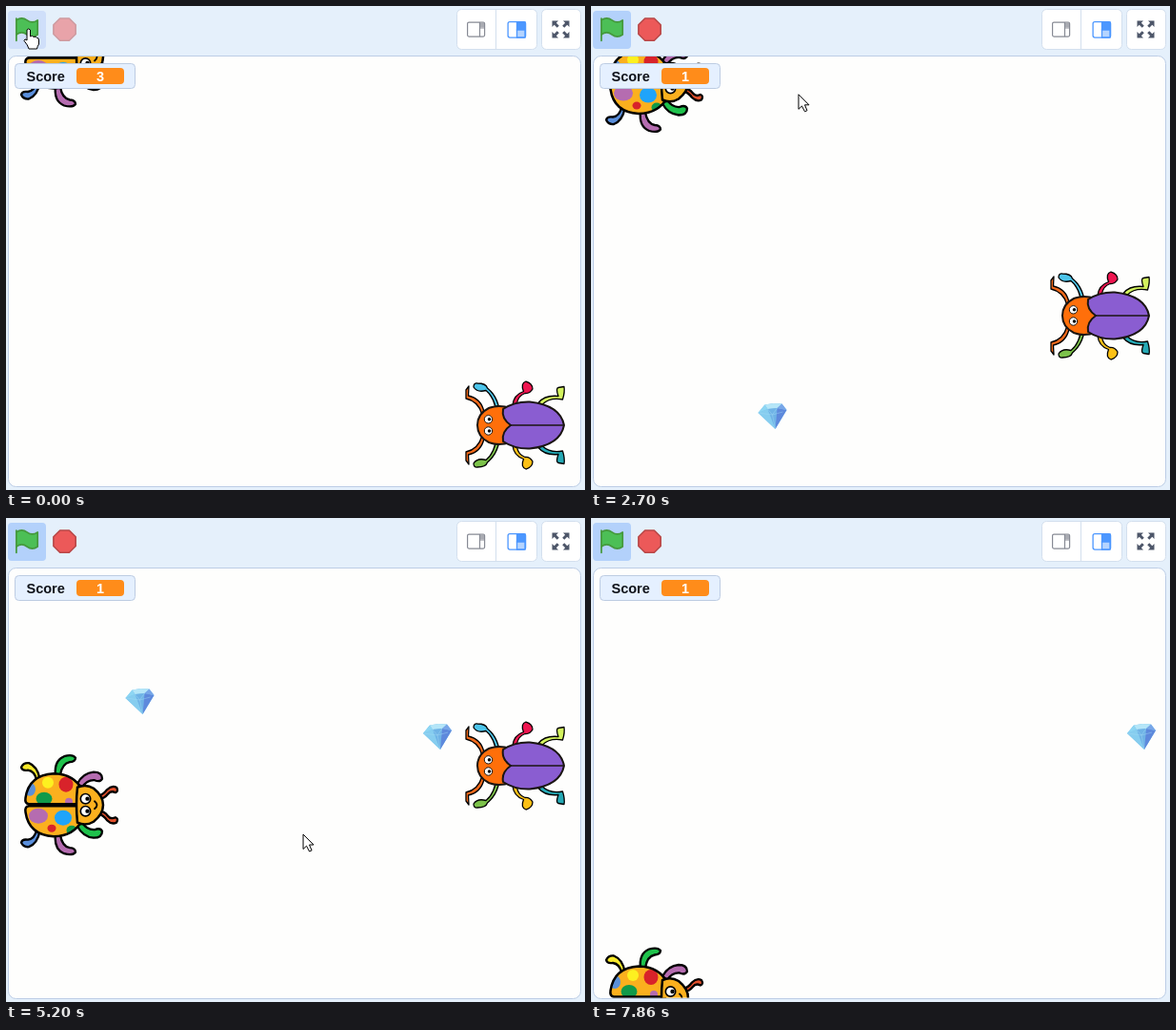
These frames come from a looping animation (608x508 px, 7.9 s). An HTML page:

```html
<!DOCTYPE html>
<html lang="en">
<head>
<meta charset="utf-8">
<title>Bug game</title>
<style>
  html, body { margin: 0; width: 100%; height: 100%; overflow: hidden; background: #e5f0fb; }
  svg { display: block; width: 608px; height: 508px; }
  text { font-family: "Liberation Sans", Arial, sans-serif; font-size: 14.5px; font-weight: bold; }
</style>
</head>
<body>
<svg viewBox="0 0 608 508" xmlns="http://www.w3.org/2000/svg">
  <defs>
    <clipPath id="stageClip"><rect x="3" y="53" width="600" height="450.5" rx="7"/></clipPath>
    <path id="lobe" d="M78 186.5H24Q19.500 186 20.500 180Q24 156 50 154.500Q72 155 80 172Z"/>
    <g id="shell"><use href="#lobe"/><use href="#lobe" transform="matrix(1 0 0 -1 0 375)"/></g>
    <clipPath id="shellClip"><use href="#lobe"/><use href="#lobe" transform="matrix(1 0 0 -1 0 375)"/></clipPath>
    <g id="gem">
      <path d="M-8-11.500L1-13 10-12.500 15-6 3 14-15-3Z" fill="#7cc4ee"/>
      <path d="M-8-11.500L1-13 10-12.500 5-8-5-7Z" fill="#b5e6f8"/>
      <path d="M-8-11.500L-5-7-15-3Z" fill="#8dd6f3"/>
      <path d="M-15-3L-5-7 3 14Z" fill="#86cdef"/>
      <path d="M-5-7L5-8 3 14Z" fill="#6fb3e6"/>
      <path d="M5-8L15-6 3 14Z" fill="#5e89dc"/>
      <path d="M10-12.500L15-6 5-8Z" fill="#78a6e8"/>
      <path d="M-5-7L0-1 3 14M0-1L5-8M-15-3L0-1 11-4" fill="none" stroke="#a5dcf5" stroke-width=".7" opacity=".6"/>
    </g>
  </defs>

  <!-- toolbar -->
  <rect id="flagBg" x="2" y="5" width="40" height="40" rx="4"/>
  <g transform="translate(9.800 12) scale(1.45)" fill="#4cbf56" stroke="#45993d" stroke-linecap="round" stroke-linejoin="round" stroke-width="1.2">
    <path d="M.75 2A6.44 6.44 0 0 1 8.44 2a6.44 6.44 0 0 0 7.69 0V12.4a6.44 6.44 0 0 1-7.69 0a6.44 6.44 0 0 0-7.69 0"/>
    <path d="M.75 16.75V.75"/>
  </g>
  <path id="stop" transform="translate(49 12.100) scale(1.79)" d="M4.300 .5H9.700L13.500 4.300V9.700L9.700 13.500H4.300L.5 9.700V4.300Z" fill="#ec5959" stroke="#b84848" stroke-width=".9" stroke-linejoin="round"/>
  <g fill="#fff" stroke="#d3dfee">
    <rect x="473.5" y="3.500" width="84" height="42" rx="5"/>
    <path d="M514.500 3.500v42"/>
    <rect x="562.5" y="3.500" width="41" height="42" rx="5"/>
  </g>
  <g fill="none" stroke="#878a94" stroke-width="1.2">
    <rect x="484.600" y="17.100" width="18" height="15" rx="1.500"/>
    <path d="M497.500 17v15M497.500 23h5"/>
    <rect x="498" y="17.500" width="4" height="5" fill="#a9abb2" stroke="none"/>
  </g>
  <g stroke="#4c97ff" stroke-width="1.300">
    <rect x="527.100" y="16.600" width="18.500" height="16.500" rx="2" fill="#fff"/>
    <path d="M536.500 17h8.500v8h-8.500z" fill="#4c97ff"/>
    <path d="M536.500 25h8.500v8h-8.500z" fill="#b5d4ff"/>
  </g>
  <g id="expand" fill="#4d5669"></g>

  <!-- stage -->
  <rect x="2.500" y="52.500" width="601" height="452" rx="8" fill="#fefefd" stroke="#bccde6"/>
  <g clip-path="url(#stageClip)">
    <g id="beetle" stroke="#1a1512" stroke-width="2" stroke-linejoin="round">
      <g id="beetleLegs" stroke="#000" stroke-width="1.300"></g>
      <path d="M530 422Q517 418 507 422Q495 428 495 440Q495 452 507 458Q517 462 530 458Z" fill="#ff6f0a"/>
      <path d="M530 440Q520 433 522 423Q534 415 550 415.500Q582 419 586 440Q582 461 550 464.500Q534 465 522 457Q520 447 530 440Z" fill="#8a5dd1"/>
      <path d="M530 440H586" fill="none" stroke-width="1.600"/>
      <g id="beetleEyes" stroke-width="1"></g>
    </g>
    <g id="gems"></g>
    <g id="lady">
      <g id="legs" stroke="#000" stroke-width="2.300" stroke-linejoin="round"></g>
      <use href="#shell" fill="#fbb01e"/>
      <g id="spots" clip-path="url(#shellClip)"></g>
      <use href="#shell" fill="none" stroke="#000" stroke-width="2.500"/>
      <path d="M75 169Q84 165 92 170Q102 178 102 187.500Q102 197 92 205Q84 210 75 206Q73 187 75 169Z" fill="#fbb01e" stroke="#000" stroke-width="2.500"/>
      <path d="M93 183.500Q98 187.500 93 191.500" fill="none" stroke="#000" stroke-width="1.800" stroke-linecap="round"/>
      <g id="ladyEyes" stroke="#000" stroke-width="1.700"></g>
    </g>
  </g>

  <!-- score -->
  <rect x="9.500" y="60.500" width="126" height="26" rx="4" fill="#e5f0ff" stroke="#bdcce2"/>
  <text x="21.500" y="79" fill="#10131a">Score</text>
  <rect x="74" y="65" width="50" height="17" rx="4" fill="#ff8c1a"/>
  <text id="score" x="99" y="79" text-anchor="middle" fill="#fff"></text>

  <g id="mouse" fill="#fff" stroke="#000" stroke-linejoin="round">
    <path id="arrow" d="M.5 .5V16L4 12.700L7 18.500L9.500 17.400L7 11.500H11.500Z"/>
    <path id="hand" d="M-1 1Q.5-1 2.500 1V8Q5 6.500 6 8.500Q8.500 7.500 9.500 9.500Q11.500 9 11.500 12V16Q10 18 9.500 21H1Q0 17-4 12.500Q-3.500 9.500-1 12Z"/>
  </g>
</svg>
<script>
const LOOP = 7900, TICK = 32.5, LAG = 60;
const $ = id => document.getElementById(id);
const clamp = (v, lo, hi) => Math.min(hi, Math.max(lo, v));
const show = (el, on) => el.setAttribute('display', on ? 'inline' : 'none');
const place = (el, x, y) => el.setAttribute('transform', `translate(${x.toFixed(2)} ${y.toFixed(2)})`);

// Each limb has an upper colour and a mirrored lower colour.
function limbs(id, axis, list) {
  const side = i => list.map(l => `<path d="${l[0]}" fill="${l[i]}"/>`).join('');
  $(id).innerHTML = side(1) + `<g transform="matrix(1 0 0 -1 0 ${axis * 2})">${side(2)}</g>`;
}
limbs('legs', 187.5, [
  ['M32 161Q30 152 23 151Q17 152 16 148Q18 143 24 143.500Q33 147 35.500 160Z', '#f7e92b', '#5a8fdc'],
  ['M52 157Q50 141 61 136.500Q70 134 73 138Q73 142 67 142.500Q59 144 57 156Z', '#1fc24c', '#b56cb0'],
  ['M75 165Q81 154 92 153Q101 153 101 160Q99 164 93 161.500Q85 161 80 169Z', '#b56cb0', '#1fc24c'],
  ['M97 178Q102 177 106 171.500Q111 166.500 116 169Q118.500 173 115 174.500Q110 172 107 176Q103 181 98 181Z', '#e2502c', '#e2502c']
]);
limbs('beetleLegs', 440, [
  ['M486 399L483 403L483 412Q496 415 499.500 428L502 426Q499 412 485.500 409Z', '#f26a1b', '#f26a1b'],
  ['M514 421Q511 409 504 403.500Q495 406 491 400Q491 395.500 495 396Q504 396 505.500 401Q514 408 517 419Z', '#4cc4ea', '#7cc24a'],
  ['M532 419Q533 408 543.500 404.500Q540 396 546 394Q553 396 553 402Q550 407 545 406.500Q538 409 536.500 417Z', '#ee1550', '#fcc015'],
  ['M559 416.500Q566 408 580 409.500Q577 401 580 400.500L586 399.500Q587 405 584.500 413Q571 410.500 563.500 418Z', '#d3f25e', '#25a9b5']
]);
const eye = (x, y, r, dx) =>
  `<circle cx="${x}" cy="${y}" r="${r}" fill="#fff"/><circle cx="${x + dx}" cy="${y}" r="${r * .42}" fill="#000" stroke="none"/>`;
$('ladyEyes').innerHTML = eye(83.5, 181, 5.2, 2) + eye(83.5, 194, 5.2, 2);
$('beetleEyes').innerHTML = eye(506.5, 433.8, 4.2, 1) + eye(506.5, 446, 4.2, 1);
$('spots').innerHTML = [
  [44, 164, 6, 6, '#fdf020'], [63, 166, 7.500, 8, '#d8232a'], [25, 171, 6, 7, '#5b90d8'],
  [40, 181, 8.500, 7, '#119a4a'], [66, 184, 4, 4, '#b56cb0'], [34, 199, 10, 8, '#b56cb0'],
  [60, 201, 9, 8, '#1fa4fa'], [48, 212, 4.500, 4, '#d8232a'], [69, 214, 5.500, 5, '#119a4a']
].map(([x, y, a, b, c]) => `<ellipse cx="${x}" cy="${y}" rx="${a}" ry="${b}" fill="${c}"/>`).join('');
$('expand').innerHTML = [0, 90, 180, 270].map(a =>
  `<path transform="translate(582.5 24.5) rotate(${a})" d="M-9-9H-2.500L-4.700-6.800L-1.700-3.800L-3.800-1.700L-6.800-4.700L-9-2.500Z"/>`).join('');

// pointer tip: time, x, y
const path = [
  [0, 23, 24], [320, 23, 24], [1008, 149, 371], [1305, 149, 280], [1800, 148, 187], [1860, 148, 188],
  [2310, 190, 431], [2640, 215, 80], [3070, 227, 305], [3500, 228, 248], [3560, 228, 235],
  [4140, 222, 229], [4270, 219, 167], [4380, 218, 85], [4500, 218, 125], [4560, 218, 126],
  [4950, 270, 192], [5070, 290, 266], [5410, 340, 394], [5840, 367, 332], [5900, 369, 308],
  [6470, 410, 229], [6630, 430, 90], [6730, 440, 121], [6900, 450, 301], [6960, 451, 346],
  [7250, 458, 430], [7600, 460, 530], [7900, 460, 540]
];
const slope = (i, c) => {
  const a = path[i], b = path[i + 1];
  return a && b ? (b[c] - a[c]) / (b[0] - a[0]) : 0;
};
const tangent = (i, c) => {
  const a = slope(i - 1, c), b = slope(i, c);
  return a * b > 0 ? 2 * a * b / (a + b) : 0;
};
// Monotone cubic through the path points.
function pointer(t, c) {
  t = clamp(t, 0, LOOP - 1);
  const i = path.findIndex((p, k) => path[k + 1][0] > t);
  const a = path[i], b = path[i + 1], h = b[0] - a[0], u = (t - a[0]) / h, v = 1 - u;
  return a[c] * v * v * (1 + 2 * u) + b[c] * u * u * (3 - 2 * u)
    + h * u * v * (tangent(i, c) * v - tangent(i + 1, c) * u);
}

// shots: launch time, y, steps before it hits a beetle or the edge
const HIT = 33, EDGE = 41;
const shots = [
  [1064, 371.5, HIT], [1356, 280, HIT], [2374, 430, EDGE], [3122, 305, EDGE],
  [4186, 229, HIT], [5006, 192, HIT], [5462, 394, EDGE], [6516, 229, EDGE]
];
$('gems').innerHTML = shots.map(() => '<use href="#gem"/>').join('');
const gems = [...$('gems').children];

// beetles: from, to, y
const beetles = [
  [0, 300, 440], [1150, 1750, 235], [1990, 2780, 325],
  [4400, 5100, 152.5], [5200, 5650, 260], [6010, 7150, 177.5]
];
const pauses = [1860, 3560];

function draw(t) {
  for (const p of pauses) if (t >= p && t < p + 70) t = p;
  const on = t >= 300;
  $('flagBg').setAttribute('fill', on ? '#b3d1fb' : '#cfdffa');
  $('stop').setAttribute('opacity', on ? 1 : .5);
  $('score').textContent = !on ? 3 : t < 2140 ? 0 : 1;

  place($('lady'), 0, clamp(pointer(t - LAG, 2), 53.5, 503.5) - 187.5);

  const b = beetles.find(([from, to]) => t >= from && t < to);
  show($('beetle'), b);
  if (b) place($('beetle'), 0, b[2] - 440);

  shots.forEach(([start, y, last], i) => {
    const n = Math.floor((t - start) / TICK);
    show(gems[i], n >= 0 && n <= last);
    place(gems[i], 65.5 + 12.5 * n, y);
  });

  const x = pointer(t, 1), y = pointer(t, 2), hand = x < 42 && y < 46;
  place($('mouse'), x, y);
  show($('hand'), hand);
  show($('arrow'), !hand);
}
function loop() {
  draw(performance.now() % LOOP);
  requestAnimationFrame(loop);
}
loop();
</script>
</body>
</html>
```
